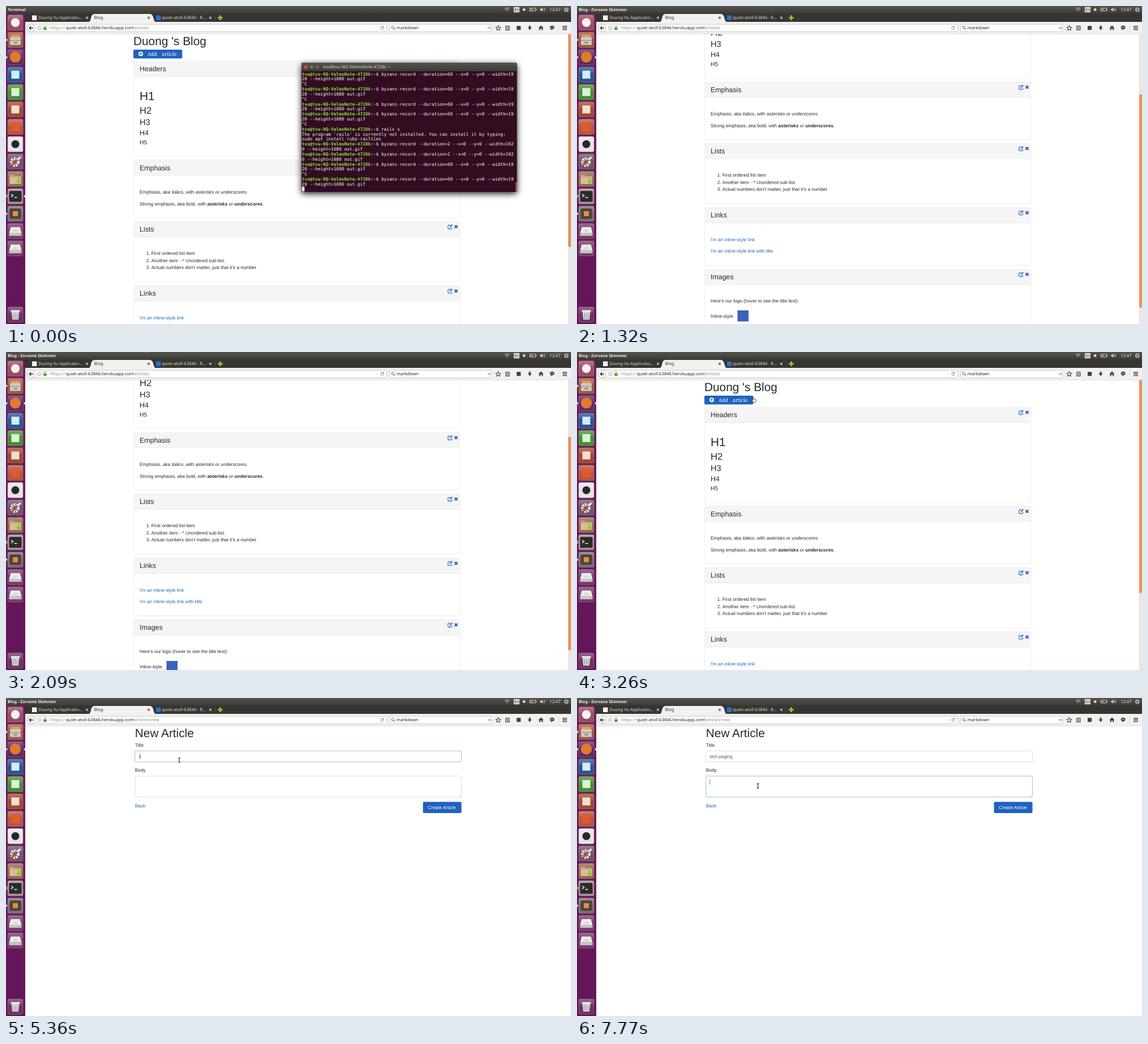
Write an HTML page that moves like this. It is 998 px wide and 561 px high and loops after 8000 ms.

```html
<!DOCTYPE html>
<html lang="en">
<head>
<meta charset="utf-8">
<title>Blog</title>
<style>
  html, body { margin: 0; width: 100%; height: 100%; overflow: hidden; background: #fff; }
  svg { position: fixed; left: 0; top: 0; width: 998px; height: 561px; display: block; }
  text { white-space: pre; text-rendering: geometricPrecision; }
  .page { font: 8.28px "Liberation Sans", Arial, sans-serif; fill: #25282b; }
  .ui { font: 7.66px "Noto Sans", "Open Sans", sans-serif; }
  .mono { font: 7.77px "DejaVu Sans Mono", monospace; fill: #fff; }
  .blue { fill: #1c66be; }
</style>
</head>
<body>
<svg id="stage" viewBox="0 0 998 561" xmlns="http://www.w3.org/2000/svg"></svg>
<script>
const LOOP = 8000;
const USER = 'tvu@tvu-NQ-VelmoNote-4720k';

const text = (x, y, s, extra = '') => `<text x="${x}" y="${y}" ${extra}>${s}</text>`;
const sized = (x, y, size, s, extra = '') => text(x, y, s, `style="font-size:${size}px" ${extra}`);
const rect = (x, y, w, h, fill, extra = '') =>
  `<rect x="${x}" y="${y}" width="${w}" height="${h}" fill="${fill}" ${extra}/>`;
const circle = (x, y, r, fill, extra = '') => `<circle cx="${x}" cy="${y}" r="${r}" fill="${fill}" ${extra}/>`;
const path = (d, extra = '') => `<path d="${d}" ${extra}/>`;
const line = (d, color, width = 1, extra = '') =>
  path(d, `fill="none" stroke="${color}" stroke-width="${width}" ${extra}`);
const group = (id, body, extra = '') => `<g id="${id}" ${extra}>${body}</g>`;
const gradient = (id, a, b) =>
  `<linearGradient id="${id}" x2="0" y2="1"><stop stop-color="${a}"/><stop offset="1" stop-color="${b}"/></linearGradient>`;

const defs = `<defs>
  ${gradient('panel', '#55534a', '#3c3b37')}
  ${gradient('dock', '#6a2059', '#641458')}
  ${gradient('gloss', 'rgba(255,255,255,.26)', 'rgba(255,255,255,0)')}
  <filter id="shade" x="-15%" y="-30%" width="130%" height="180%">
    <feDropShadow dx="0" dy="3" stdDeviation="6" flood-opacity=".9"/></filter>
  <filter id="soft" x="-5%" y="-40%" width="110%" height="220%">
    <feDropShadow dx="0" dy="2" stdDeviation="3.5" flood-opacity=".5"/></filter>
</defs>`;

// ---- article list ----
function card(top, height, title, body) {
  const y = top + 9.4;
  return rect(225.3, top + .3, 576.4, height, '#fff', 'rx="2" stroke="#dfdfdf" stroke-width=".6"') +
    rect(225.6, top + .6, 575.8, 26.6, '#f5f5f5') +
    line(`M225.3 ${top + 27.2}h576.4`, '#dfdfdf', .6) +
    sized(236, top + 18, 12.4, title) +
    line(`M785.5 ${y - 2.9}h-3.2q-1.6 0 -1.6 1.6v3.7q0 1.6 1.6 1.6h3.7q1.6 0 1.6 -1.6v-1.2`, '#1c5fb8', 1.1) +
    line(`M783.9 ${y + .9}l4.4 -4.4`, '#1c5fb8', 1.7) +
    line(`M792.5 ${y - 2.4}l4.9 4.9m0 -4.9l-4.9 4.9`, '#1c5fb8', 2) + body;
}

const headings = [[20.8, 165.7], [16.64, 189.6], [14.56, 210.2], [12.475, 228.3], [10.4, 244.1]]
  .map(([size, y], i) => sized(236, y, size, 'H' + (i + 1))).join('');
const items = ['First ordered list item', 'Another item ··* Unordered sub-list.',
  "Actual numbers don't matter, just that it's a number"]
  .map((s, i) => text(247.8, 439.4 + i * 12.5, i + 1 + '.') + text(256.8, 439.4 + i * 12.5, s)).join('');

const listPage = group('list', group('sheet',
  sized(225, 68.8, 20.8, "Duong 's Blog") +
  rect(225, 77, 86.3, 15.6, '#2062be', 'rx="2" id="add"') +
  circle(238, 84.4, 4, '#fff') + line('M235.8 84.4h4.4m-2.2 -2.2v4.4', '#2062be', 1.3) +
  `<g fill="#fff" style="font:8.7px 'Noto Serif','Liberation Serif',serif">${text(250, 88, 'Add')}${text(275, 88, 'article')}</g>` +
  card(97, 168, 'Headers', headings) +
  card(271.7, 102, 'Emphasis',
    text(236, 330.7, 'Emphasis, aka italics, with <tspan font-style="italic">asterisks</tspan> or <tspan font-style="italic">underscores</tspan>.') +
    text(236, 351.6, 'Strong emphasis, aka bold, with <tspan font-weight="bold">asterisks</tspan> or <tspan font-weight="bold">underscores</tspan>.')) +
  card(380, 106.8, 'Lists', items) +
  card(493.3, 102, 'Links',
    text(236, 552.5, "I'm an inline-style link", 'class="blue"') +
    text(236, 573.3, "I'm an inline-style link with title", 'class="blue"')) +
  card(602, 113, 'Images',
    text(236, 661, "Here's our logo (hover to see the title text):") +
    text(236, 687.6, 'Inline-style:') + rect(283.5, 675, 19.5, 19.5, '#3a62b8'))) +
  rect(992.6, 49, 5.4, 512, '#e9e6e2') + rect(993, 49, 5, 376, '#ee925f', 'id="thumb"') +
  group('status', rect(34, 549.5, 199, 12, '#f2f1f0', 'stroke="#c9c6c1" stroke-width=".6"') +
    text(36, 558, 'https://quiet-atoll-63846.herokuapp.com/articles/new', 'class="ui" fill="#4c4c4c"')),
  'class="page"');

// ---- new article form ----
const field = (id, y, h) => {
  const box = (color, extra) => rect(227.8, y, 576.6, h, '#fff', `rx="2" stroke="${color}" stroke-width=".6" ${extra}`);
  return box('#c4c4c4', '') + box('#5fa8e4', `id="${id}"`);
};

const formPage = group('form',
  sized(227.8, 68.8, 20.8, 'New Article') +
  text(227.8, 85.8, 'Title') + field('titleFocus', 93.3, 19.3) +
  text(234.4, 106, '', 'id="typed" fill="#555a5f"') +
  text(227.8, 130.4, 'Body') + field('bodyFocus', 137.8, 37) +
  line('M801 173.6l2.4 -2.4m-1 2.4l1 -1', '#999', .5) +
  text(227.8, 192.5, 'Back', 'class="blue"') +
  rect(736.5, 183.2, 68, 19.8, '#2062be', 'rx="2"') + text(745, 196.2, 'Create Article', 'fill="#fff"') +
  rect(0, 0, .6, 9.4, '#222', 'id="caret"') +
  group('popup', rect(227.5, 112.7, 577, 22, '#464339', 'id="popupBox" filter="url(#soft)"') +
    '<g id="options" class="ui" fill="#eceae4"></g>'),
  'class="page"');

// ---- terminal window ----
function terminal() {
  const record = n => `$byzanz-record --duration=${n} --x=0 --y=0 --width=1920 --height=1080 out.gif`;
  const log = [record(60), '^C', record(60), '^C', record(60), record(60), '^C', '$rails s',
    "The program 'rails' is currently not installed. You can install it by typing:",
    'sudo apt install ruby-railties', record(2), record(2), record(60), '^C', record(60)];
  const prompt = `<tspan font-weight="bold" fill="#8ae234">${USER}</tspan>:<tspan font-weight="bold" fill="#729fcf">~</tspan>$ `;
  const lead = USER.length + 4;
  let row = 0, out = '';
  const put = s => { out += text(522.6, 122.6 + 8.83 * row++, s); };
  for (const s of log) {
    if (s[0] !== '$') { put(s); continue; }
    const cmd = s.slice(1), cut = 80 - lead;
    put(prompt + cmd.slice(0, cut));
    if (cmd.length > cut) put(cmd.slice(cut));
  }
  return group('terminal',
    path('M522 328V103q0 -3 3 -3h374.5q3 0 3 3V328z', 'fill="#300a24" filter="url(#shade)"') +
    path('M522 115V103q0 -3 3 -3h374.5q3 0 3 3V115z', 'fill="url(#panel)"') +
    circle(529.7, 107.6, 3.6, '#e9603a', 'stroke="#33312c" stroke-width=".6"') +
    [539.7, 549.6].map(x => circle(x, 107.6, 3.5, '#7d7b72', 'stroke="#33312c" stroke-width=".6"')).join('') +
    line('M528.4 106.3l2.6 2.6m0 -2.6l-2.6 2.6M538.2 107.6h3M548.3 106.4h2.6v2.4h-2.6z', '#3a2a22', .8) +
    sized(560, 110.3, 7.7, USER + ': ~', 'class="ui" font-weight="600" fill="#dfdbd2"') +
    `<g class="mono">${out}</g>` + rect(522.8, 318.6, 4.4, 8.6, '#fff') +
    rect(900.3, 311, 2.2, 16.5, '#c4694a'));
}

// ---- browser chrome ----
const closeMark = (x, c) => line(`M${x - 1.8} 18.9l3.6 3.6m0 -3.6l-3.6 3.6`, c, 1.1);
const dark = '#45443f';
const chrome = `<g class="ui">` +
  rect(0, 13, 998, 15.5, '#373531') +
  path('M145 28.5q4 0 5 -7t6 -7.5h98q5 0 6.5 7.5t5.5 7z', 'fill="#f2f1f0"') +
  rect(34, 28, 964, 21.3, '#f2f1f0') + line('M34 49.2h964', '#cfccc7', .6) +
  rect(46, 16.6, 8.4, 8.4, '#f4f4f4') + text(57.5, 23.3, 'Duong Vu Applicatio…', 'fill="#dedbd5" style="font-size:7.5px"') +
  closeMark(143, '#d8d5cf') + text(155.5, 23.3, 'Blog', 'fill="#333"') + closeMark(252, '#444') +
  rect(265, 16.6, 8.4, 8.4, '#2c6fc9') + text(275.3, 23.3, 'quiet-atoll-63846 · R…', 'fill="#dedbd5"') +
  closeMark(361, '#d8d5cf') + line('M369.5 16v10', '#5b5953', .7) +
  line('M374.2 20.7h8.4m-4.2 -4.2v8.4', '#86c440', 3) +
  rect(46, 32.3, 626.3, 13, '#fff', 'rx="1.5" stroke="#bebbb5" stroke-width=".7"') +
  circle(44.4, 38.7, 7, '#fafafa', 'stroke="#aaa7a1" stroke-width=".8"') +
  line('M48 38.7h-6.6m2.9 -3l-3 3l3 3', '#333', 1.4) +
  circle(59, 38.7, 3.3, 'none', 'stroke="#888" stroke-width=".7"') + line('M59 38.2v2.4m0 -4v.9', '#888', .8) +
  rect(66.2, 38, 5.4, 4, '#3fa02c', 'rx=".5"') + line('M67.2 38v-1.2q0 -1.7 1.7 -1.7t1.7 1.7v1.2', '#3fa02c', 1) +
  line('M74.8 35v7.5', '#d4d1cc', .5) +
  `<g fill="#8b8b8b">${text(78, 41.4, 'https://')}${text(105.8, 41.4, 'quiet-atoll-63846.herokuapp.com', 'fill="#222"')}${text(224, 41.4, '', 'id="route"')}</g>` +
  line('M656 33v11.6', '#d0cdc8', .5) +
  line('M666.6 37a2.6 2.6 0 1 0 .4 2.6m0 -4v2.2h-2.2', '#555', .8) +
  rect(677.2, 32.3, 180.6, 13, '#fff', 'rx="1.5" stroke="#bebbb5" stroke-width=".7"') +
  circle(683, 37.8, 2.2, 'none', 'stroke="#555" stroke-width=".9"') + line('M684.6 39.4l2.4 2.4', '#555', 1.1) +
  text(689.8, 41.4, 'markdown', 'fill="#222"') + line('M850.4 38.7h5.4m-2.4 -2.4l2.4 2.4l-2.4 2.4', '#666', .8) +
  line('M869.5 34.6l1.3 2.7 2.9 .4 -2.1 2 .5 2.9 -2.6 -1.4 -2.6 1.4 .5 -2.9 -2.1 -2 2.9 -.4z', dark, 1.1) +
  line('M882.7 35.8h6.4v6.6h-6.4zM884 38h3.8m-3.8 2h3.8M884.4 35.2h3', dark, 1.1) +
  rect(902, 35, 7.2, 7.2, dark) +
  path('M923.7 34.4h2.8v3.4h2.2l-3.6 4.6l-3.6 -4.6h2.2z', `fill="${dark}"`) +
  path('M945 34.2l4.6 4.2h-1.3v4h-2.2v-2.6h-2.2v2.6h-2.2v-4h-1.3z', `fill="${dark}"`) +
  path('M964.6 34.6c5.4 0 5.4 6.4 .6 6.4l-2.6 1.8v-2.1c-3 -1 -2.6 -6.1 2 -6.1', `fill="${dark}"`) +
  line('M962.4 37.8h4.4', '#f2f1f0', .9) + line('M976.3 33v11.6', '#d0cdc8', .6) +
  line('M983 35.7h8m-8 2.9h8m-8 2.9h8', dark, 1.5) +
  rect(0, 0, 998, 13.3, 'url(#panel)') +
  sized(3, 9.1, 7.2, '', 'id="app" font-weight="600" fill="#f0ede6"') +
  line('M880.8 5q4.3 -3.6 8.6 0m-7 1.8q2.7 -2.2 5.4 0m-3.6 1.7q.9 -.6 1.8 0', '#dfdbd2', .9) +
  rect(896.8, 1.8, 10.2, 9.4, '#dfdbd2', 'rx="1"') + sized(898, 9, 7, 'En', 'fill="#3c3b37"') +
  circle(915.2, 6.4, 2.4, '#dfdbd2') +
  line('M925.2 3.8h10.2v5h-10.2zM936.6 5.2v2.2', '#dfdbd2', .9) + rect(926.4, 5, 4.6, 2.6, '#d8785a') +
  path('M943.4 5h1.8l2.3 -2v6.8l-2.3 -2h-1.8z', 'fill="#dfdbd2"') +
  line('M949 4.6q1.5 1.8 0 3.6m1.6 -5q2.8 3.2 0 6.4', '#dfdbd2', .8) +
  text(960, 9.1, '12:47', 'fill="#e8e5dd"') +
  circle(989.8, 6.4, 2.4, 'none', 'stroke="#dfdbd2" stroke-width="1.2"') +
  circle(989.8, 6.4, 3.6, 'none', 'stroke="#dfdbd2" stroke-width="1.2" stroke-dasharray="1.2 1.63"') + '</g>';

// ---- launcher ----
const drive = path('M-8 -7h16l3 10h-22z', 'fill="#ececea"') + rect(-11, 3, 22, 5.5, '#c6c6c4', 'rx="1"') +
  path('M-5 0q5 -7 10 0q-5 3 -10 0', 'fill="#dadad8"') + circle(8, 5.8, .9, '#6fbf4a');
const mark = (color, r = 8) => rect(-r, -r, 2 * r, 2 * r, color);
const tiles = [
  ['#9a4d62', circle(0, 0, 7.8, '#f6f0f2')],
  ['#9c5a3a', rect(-9.5, -5, 19, 14, '#cfcbc3', 'rx="1.5"') + line('M-9.5 1h19', '#8a857c', 1) +
    rect(-3.5, 3.6, 7, 2.4, '#8f8a82') + rect(-8, -9, 16, 4.4, '#e89a5c')],
  ['#5f2a63', circle(0, -.5, 9.8, '#e07a2c')],
  ['#1d5a98', mark('#dbe8f5', 7)],
  ['#3f9330', mark('#dff0d8', 7)],
  ['#a2492c', mark('#f1dfd6', 7)],
  ['#b5563a', mark('#dd5b32')],
  ['#e6e4e4', circle(0, 0, 7, '#28262a')],
  ['#6e5568', circle(-1, 1, 6, 'none', 'stroke="#e6e6e6" stroke-width="5" stroke-dasharray="2.9 1.4"') +
    line('M-7 8L5 -4', '#c2493a', 3.2) + line('M4 -3l5 -5', '#eee', 3.4)],
  ['#8f6a4d', path('M-10 -7h7l2 2h11v14h-20z', 'fill="#c9a77e"') + rect(-10, -2.5, 20, 11.5, '#dbbd95') +
    path('M4 -1h4v5h3l-5 6l-5 -6h3z', 'fill="#8cc63e"')],
  ['#9a9596', rect(-11, -9.5, 22, 19, '#2c2a2b', 'rx="1.5"') + line('M-7.5 -4l3.6 2.6l-3.6 2.6M-2 2h5', '#f4f4f4', 1.4)],
  ['#77706f', rect(-10, -9, 20, 18, '#454344', 'rx="2"') + mark('#ef8b2f', 4.5)],
  ['#753a6b', drive],
  ['#753a6b', drive],
  ['#6d3364', path('M-7 -6h14l-1.6 15h-10.8z', 'fill="#d4d4d2"') + line('M-8 -6.4h16', '#f2f2f0', 2.6) +
    line('M-3.4 -2l.6 9m2.8 -9v9m3.4 -9l-.6 9', '#9a9a98', 1)]
];
const tileY = i => i === 14 ? 544.3 : 29.2 + i * 30.65;
const pip = y => path(`M0 ${y - 2.6}l2.8 2.6l-2.8 2.6z`, 'fill="#eee"');
const launcher = rect(0, 13.3, 33.8, 548, 'url(#dock)') + line('M33.6 13.3v548', '#4a0a3e', .5) +
  tiles.map(([color, art], i) => `<g transform="translate(16.5 ${tileY(i)})">` +
    rect(-13.4, -13.4, 26.8, 26.8, color, 'rx="2.6" stroke="rgba(255,255,255,.3)" stroke-width=".7"') +
    rect(-13, -13, 26, 13, 'url(#gloss)', 'rx="2.4"') + art + '</g>').join('') +
  [1, 2, 11].map(i => pip(tileY(i))).join('') +
  path('M0 333.4h2.4v1.4h-2.4zm0 2.8h2.4v1.4h-2.4z', 'fill="#eee"') +
  path('M34 -2.8l-3 2.8l3 2.8z', 'fill="#eee" id="active"');

// ---- pointers, with the hot spot at the origin ----
const pointers =
  group('hand', path('M-1 0q0 -1 .9 -1t.9 1v2.6l3.2 .6q1.2 .3 1.1 1.6l-.4 2.2l-.6 1.2h-4.2l-2.4 -3q-.5 -1 .6 -1l.9 .6z',
    'fill="#fff" stroke="#222" stroke-width=".8"')) +
  group('beam', line('M-1.8 -3.9h3.6M-1.8 3.9h3.6M0 -3.9v7.8', '#fff', 2) +
    line('M-1.6 -3.9h3.2M-1.6 3.9h3.2M0 -3.9v7.8', '#222', 1.1)) +
  group('arrow', path('M0 0v7.6l1.8 -1.6l1.2 2.8l1.3 -.6l-1.2 -2.7h2.4z', 'fill="#222" stroke="#fff" stroke-width=".6"'));

document.getElementById('stage').innerHTML =
  defs + rect(0, 0, 998, 561, '#fff') + listPage + formPage + chrome + launcher + terminal() + pointers;

// ---- timeline ----
const scrollSteps = [[0, 0], [1140, 12], [1200, 55], [1260, 100], [1320, 138], [1380, 152], [1440, 162],
  [1500, 169], [1560, 173], [1620, 175], [2030, 163], [2090, 130], [2150, 72], [2210, 20], [2270, 0]];
const keyTimes = [5360, 5500, 5650, 5800, 5920, 6140, 6260, 6400, 6520, 6670, 6820];
const phrase = 'test paging';
const optionSteps = [[0, 0], [5430, 7], [6200, 2], [6890, 0]];
const options = ['test paging', 'test pagination', 'test', 'test 1', 'test 2', 'test 3', 'title'];
const pointerSteps = [[0, ''], [3260, 'hand'], [4130, 'beam'], [5430, 'arrow'], [6890, 'beam']];
const pointerPath = [[3260, 311.5, 80.5], [3500, 303, 83], [3760, 301, 87], [4030, 304, 89], [4129, 304, 89],
  [4130, 305, 101], [4470, 305, 101], [4600, 306, 109.8], [5429, 306, 109.8], [5430, 305.3, 108.6],
  [6889, 305.3, 108.6], [6890, 306, 110.8], [7390, 306, 110.8], [7630, 319.6, 155]];

const at = (steps, t) => steps.filter(s => s[0] <= t).pop()[1];
const ramp = (t, from, length) => Math.min(1, Math.max(0, (t - from) / length));
function along(points, t) {
  const i = points.findIndex(p => p[0] > t);
  if (i < 0) return points[points.length - 1].slice(1);
  if (i === 0) return points[0].slice(1);
  const [a, b] = [points[i - 1], points[i]], k = ramp(t, a[0], b[0] - a[0]);
  return [a[1] + (b[1] - a[1]) * k, a[2] + (b[2] - a[2]) * k];
}

const nodes = {};
document.querySelectorAll('#stage [id]').forEach(n => nodes[n.id] = n);
const show = (id, on) => { nodes[id].style.display = on ? '' : 'none'; };
const set = (id, attrs) => { for (const k in attrs) nodes[id].setAttribute(k, attrs[k]); };

function draw(t) {
  const raised = t >= 380, onForm = t >= 4130, onBody = t >= 7770;
  show('terminal', !raised);
  nodes.app.textContent = raised ? 'Blog - Zorvane Skimmer' : 'Terminal';
  set('active', { transform: `translate(0 ${tileY(raised ? 2 : 10)})` });
  nodes.route.textContent = onForm ? '/articles/new' : '/articles';
  show('list', !onForm);
  show('form', onForm);

  const y = at(scrollSteps, t);
  set('sheet', { transform: `translate(0 ${-y})` });
  set('thumb', { y: 49 + y * .776 });
  show('status', t >= 3420);
  const h = ramp(t, 3260, 200);
  set('add', { fill: `rgb(${32 - 8 * h},${98 - 22 * h},${190 - 40 * h})` });

  nodes.typed.textContent = phrase.slice(0, keyTimes.filter(k => k <= t).length);
  set('titleFocus', { opacity: onBody ? 0 : ramp(t, 4500, 150) });
  set('bodyFocus', { opacity: onBody ? 1 : 0 });
  show('caret', t >= 4530);
  if (onForm) {
    const end = nodes.typed.textContent ? nodes.typed.getComputedTextLength() : 0;
    set('caret', onBody ? { x: 234.5, y: 143.3 } : { x: 234.5 + end, y: 98.3 });
  }

  const count = at(optionSteps, t);
  show('popup', count > 0);
  set('popupBox', { height: count * 10.4 + 1.2 });
  nodes.options.innerHTML = options.slice(0, count).map((s, i) => text(233.2, 121.6 + i * 10.4, s)).join('');

  const kind = at(pointerSteps, t), [px, py] = along(pointerPath, t);
  for (const id of ['hand', 'beam', 'arrow']) {
    show(id, id === kind);
    set(id, { transform: `translate(${px} ${py})` });
  }
}

const start = performance.now();
function tick() {
  draw((performance.now() - start) % LOOP);
  requestAnimationFrame(tick);
}
tick();
</script>
</body>
</html>
```
